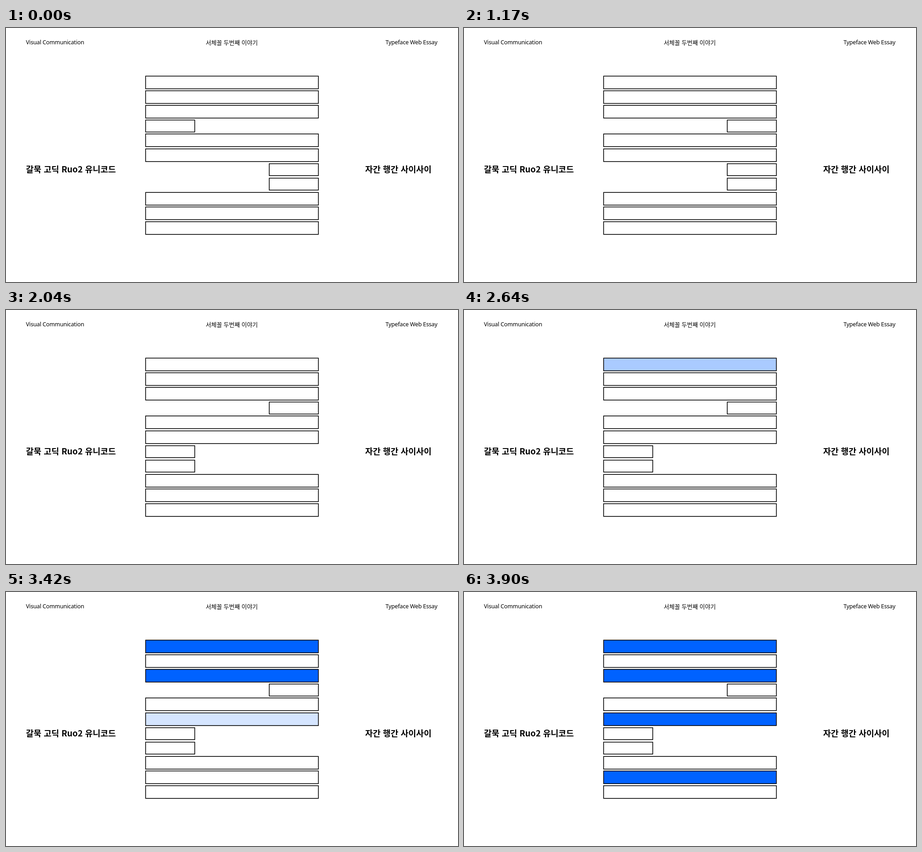
Recreate the animation shown at these times as an HTML page. Size 998 by 561 pixels, loop 4800 ms.

```html
<!DOCTYPE html>
<html lang="ko">
<head>
<meta charset="utf-8">
<title>자간 행간 사이사이</title>
<style>
  html, body { margin: 0; width: 100%; height: 100%; overflow: hidden; background: #fff; }
  svg { display: block; width: 100vw; height: 100vh; }
  rect { stroke: #000; stroke-width: 1.6; fill: #fff; }
  text { font: 13px "Noto Sans CJK KR", "Noto Sans CJK", "Noto Sans KR", sans-serif; fill: #000; }
  .latin { font: 12.6px "Noto Sans", sans-serif; letter-spacing: -.2px; }
  .bold { font-weight: 700; font-size: 18.5px; }
</style>
</head>
<body>
<svg viewBox="0 0 998 561">
  <text class="latin" x="44" y="36">Visual Communication</text>
  <text x="498.5" y="36.5" text-anchor="middle">서체꼴 두번째 이야기</text>
  <text class="latin" x="838" y="36">Typeface Web Essay</text>
  <text class="bold" x="44" y="319">갈묵 고딕 Ruo2 유니코드</text>
  <text class="bold" x="793" y="319">자간 행간 사이사이</text>
  <g id="bars"></g>
</svg>
<script>
const LOOP = 4800, STEP = 30;
const LEFT = 308.3, RIGHT = 581.3;
const LONG = { width: 381.4, height: 28 };
const SHORT = { width: 108.4, height: 26.4 };
const BLUE = [0, 98, 255];

const group = document.getElementById('bars');
const clamp = v => Math.min(1, Math.max(0, v));
const mix = (a, b, u) => a + (b - a) * u;

function addBar(y, size, x = LEFT) {
  const bar = document.createElementNS('http://www.w3.org/2000/svg', 'rect');
  for (const [key, value] of Object.entries({ x, y, ...size })) bar.setAttribute(key, value);
  group.append(bar);
  return bar;
}

const [first, , third, , sixth, , tenth] =
  [106.3, 138.6, 170.9, 234, 267, 363.2, 395.3, 427.8].map(y => addBar(y, LONG));
const upper = addBar(203.3, SHORT);
const lower = [299.7, 331.6].map(y => addBar(y, SHORT, RIGHT));

const fills = [
  { bar: first, start: 2610 },
  { bar: third, start: 3030 },
  { bar: sixth, start: 3405 },
  { bar: tenth, start: 3810 }
];

// Accelerate to the right of the goal, swing to its left, then settle.
function slide(from, to, ms) {
  const high = to + 14.3, low = to - 12;
  if (ms < 450) return mix(from, high, clamp(ms / 450) ** 1.9);
  if (ms < 615) return mix(high, low, (ms - 450) / 165);
  return mix(low, to, 1 - (1 - clamp((ms - 615) / 135)) ** 1.5);
}

function tint(u) {
  return `rgb(${BLUE.map(c => Math.round(mix(255, c, u))).join()})`;
}

function render(time) {
  const t = Math.floor((time % LOOP) / STEP) * STEP;
  upper.setAttribute('x', slide(LEFT, RIGHT, t - 420));
  const x = slide(RIGHT, LEFT, t - 1290);
  for (const bar of lower) bar.setAttribute('x', x);
  for (const { bar, start } of fills) bar.style.fill = tint(clamp((t - start) / 90));
}

const origin = performance.now();
function tick() {
  render(performance.now() - origin);
  requestAnimationFrame(tick);
}
tick();
</script>
</body>
</html>
```
